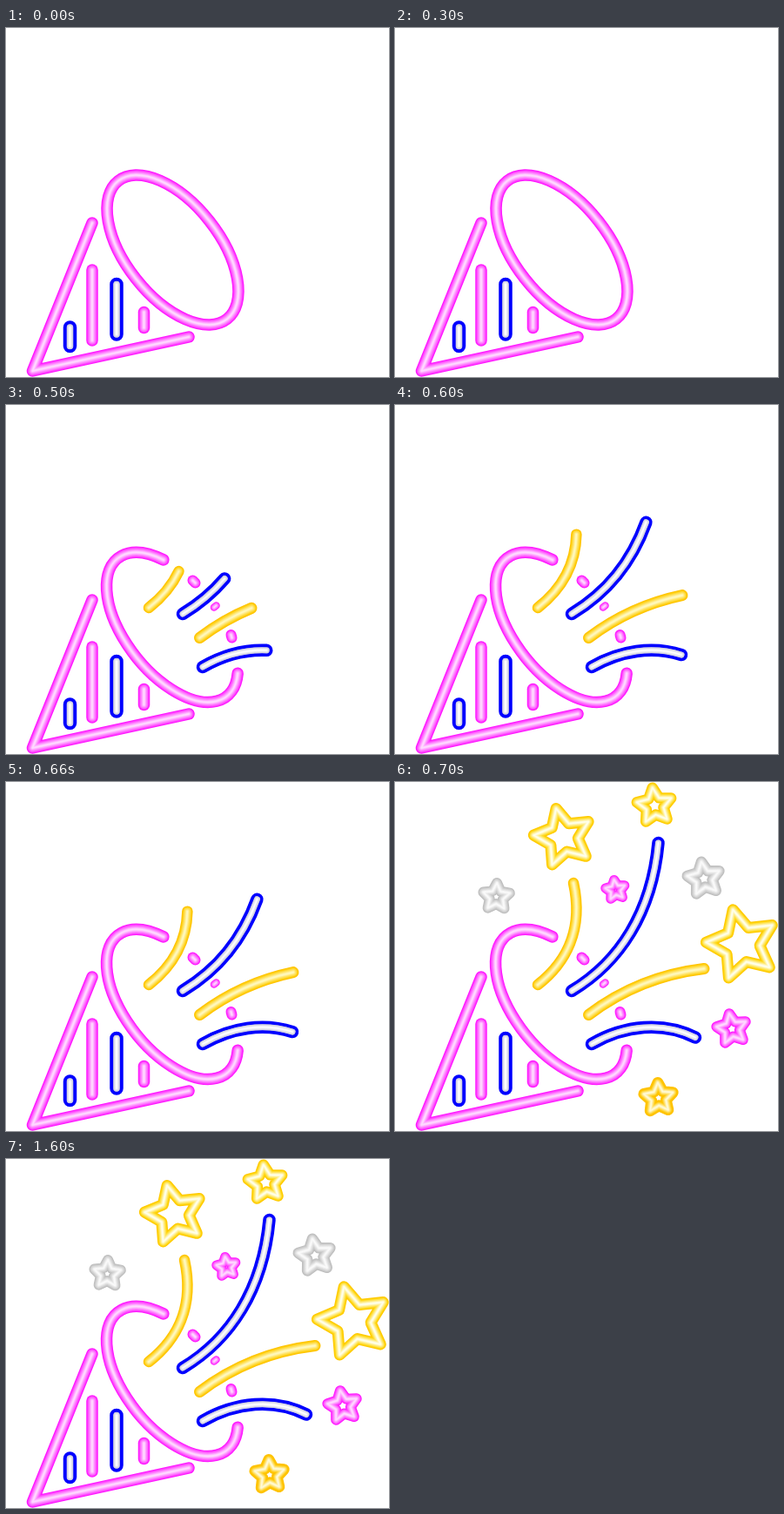
Recreate the animation shown at these times as an HTML page with a canvas. Size 440 by 401 pixels, loop 2.2 s.

```html
<!DOCTYPE html>
<html lang="en">
<head>
<meta charset="utf-8">
<title>Neon party popper</title>
<style>
html, body { margin: 0; width: 100%; height: 100%; overflow: hidden; background: #fff; }
canvas { display: block; }
</style>
</head>
<body>
<canvas id="stage" width="440" height="401"></canvas>
<script>
const ctx = document.getElementById('stage').getContext('2d');
const LOOP = 2200;
const STARTS = [0, 500, 600, 700];

// Each tube: rim colour, start and end of the inner glow, inner width share
const PINK = { rim: [255, 22, 255], from: [255, 55, 255], to: [255, 218, 255], core: 0.84 };
const GOLD = { rim: [255, 194, 0], from: [255, 205, 8], to: [255, 248, 190], core: 0.84 };
const STAR_GOLD = { rim: [255, 200, 0], from: [255, 212, 5], to: [255, 255, 235], core: 0.84 };
const DEEP_GOLD = { rim: [255, 194, 0], from: [255, 200, 5], to: [255, 250, 215], core: 0.7 };
const GREY = { rim: [190, 190, 190], from: [196, 196, 196], to: [250, 250, 250], core: 0.86 };
const BLUE = { rim: [0, 0, 255], from: [200, 200, 220], to: [255, 255, 255], core: 0.49 };

const rgb = c => `rgb(${c.map(Math.round).join(',')})`;
const mix = (a, b, t) => a.map((v, i) => v + (b[i] - v) * t);

function tube(path, look, width = 13.5) {
  const layers = 9;
  ctx.lineCap = ctx.lineJoin = 'round';
  const stroke = (w, c) => {
    ctx.lineWidth = w;
    ctx.strokeStyle = rgb(c);
    ctx.stroke(path);
  };
  stroke(width, look.rim);
  for (let i = 0; i < layers; i++) {
    const t = i / (layers - 1);
    stroke(width * look.core * (1 - 0.86 * t), mix(look.from, look.to, t));
  }
}

const line = (x1, y1, x2, y2) => new Path2D(`M${x1} ${y1}L${x2} ${y2}`);

// First part of a cubic curve, up to parameter t
function curveTo(p, t) {
  const [a, b, c, d] = p;
  const ab = mix(a, b, t), bc = mix(b, c, t), cd = mix(c, d, t);
  const abc = mix(ab, bc, t), bcd = mix(bc, cd, t);
  return new Path2D(`M${a}C${ab} ${abc} ${mix(abc, bcd, t)}`);
}

function star(x, y, r, deg) {
  const path = new Path2D();
  for (let i = 0; i < 10; i++) {
    const a = (deg + i * 36) * Math.PI / 180;
    const d = i % 2 ? r * 0.5 : r;
    path.lineTo(x + d * Math.cos(a), y + d * Math.sin(a));
  }
  path.closePath();
  return path;
}

const cone = new Path2D('M99 224L30.5 394L210 355');
const ring = new Path2D();
ring.ellipse(191.5, 255, 101, 53.7, 51.7 * Math.PI / 180, 0, 2 * Math.PI);
const openRing = new Path2D('M180.9 177.9A101 53.7 51.7 1 0 266.2 308.3');

const bars = [
  [line(73.5, 344, 73.5, 365.5), BLUE, 15.5],
  [line(99, 278, 99, 359), PINK, 13.5],
  [line(127, 294.5, 127, 352), BLUE, 15.5],
  [line(158.5, 326.5, 158.5, 344.5), PINK, 13.5]
];

const dots = [
  [line(214.5, 201.5, 217.5, 204.5), PINK, 12],
  [line(239, 232.5, 241.5, 230.5), PINK, 8.5],
  [line(258.5, 264, 259.5, 267.5), PINK, 12]
];

// Streamers and how far each reaches at each step
const rays = [
  { p: [[164, 233], [196, 208], [217, 170], [205, 116]], look: GOLD, w: 12.5, reach: [0, 0.45, 0.785, 1] },
  { p: [[203, 240], [258, 207], [295, 150], [302.5, 70]], look: BLUE, w: 14.5, reach: [0, 0.33, 0.705, 1] },
  { p: [[222.5, 267.5], [260, 239], [305, 220.5], [355, 214.5]], look: GOLD, w: 13, reach: [0, 0.485, 0.83, 1] },
  { p: [[226, 301], [264, 279], [308, 275], [345, 293.5]], look: BLUE, w: 14.5, reach: [0, 0.61, 0.86, 1] }
];

const stars = [
  [star(193.3, 63.5, 34, -104), STAR_GOLD, 13],
  [star(298.3, 27.3, 20.8, -97), STAR_GOLD, 12.5],
  [star(398.5, 186.7, 41.2, -104.5), STAR_GOLD, 13],
  [star(302.8, 363, 17.5, -93), DEEP_GOLD, 13],
  [star(116.5, 132, 16, -88), GREY, 12],
  [star(355, 111, 19.5, -99), GREY, 12.5],
  [star(253.3, 124, 11.7, -98), PINK, 11],
  [star(387, 283.7, 17.8, -100), PINK, 12]
];

const drawAll = list => list.forEach(item => tube(...item));

function draw(step) {
  ctx.fillStyle = '#fff';
  ctx.fillRect(0, 0, 440, 401);
  tube(cone, PINK);
  tube(step ? openRing : ring, PINK);
  drawAll(bars);
  if (!step) return;
  drawAll(dots);
  rays.forEach(r => tube(curveTo(r.p, r.reach[step]), r.look, r.w));
  if (step === 3) drawAll(stars);
}

let shown = -1;
const start = performance.now();

function tick() {
  const t = (performance.now() - start) % LOOP;
  const step = STARTS.filter(s => s <= t).length - 1;
  if (step !== shown) draw(shown = step);
  requestAnimationFrame(tick);
}
tick();
</script>
</body>
</html>
```
